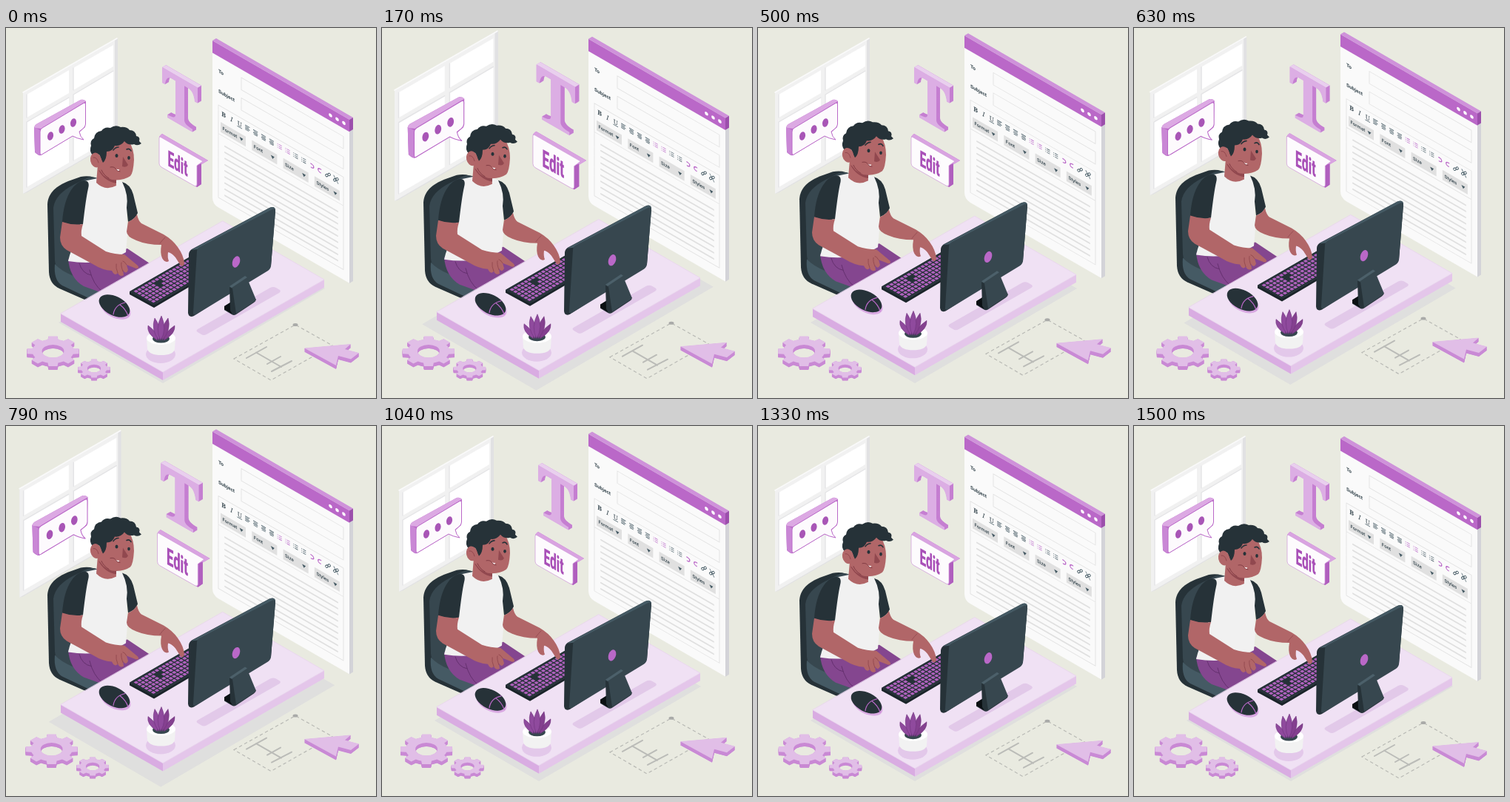
These frames come from a looping animation (500 px wide and 500 px high, 1.54 s). An HTML page:

```html
<!DOCTYPE html>
<html lang="en">
<head>
<meta charset="utf-8">
<title>Editing at a desk</title>
<style>
html, body { margin: 0; width: 100%; height: 100%; overflow: hidden; background: #e9eae0; }
svg { display: block; width: 100vw; height: 100vh; }
text { font-family: Roboto, sans-serif; }
.skin { fill: #b16668; }
.dark { fill: #263238; }
.slate { fill: #37474f; }
.line { fill: none; stroke-linecap: round; stroke-linejoin: round; }
</style>
</head>
<body>
<svg viewBox="0 0 500 500">
  <g data-beat="251 375">
    <path d="M71 398L290 271L431 352L212 480Z" fill="#dfdfde"/>
  </g>

  <g data-beat="87.3 119">
    <path d="M23 87L147 15L151 14V151L27 223L23 224Z" fill="#e1e1e3"/>
    <path d="M23 87L147 16V152L23 224Z" fill="#f1f1f1"/>
    <path d="M28 90L85 57V88L28 121ZM91 54L145 23V52L91 84ZM28 127L85 94V182L28 215ZM91 90L145 58V148L91 179Z" fill="#fff"/>
    <path class="line" d="M28 121V90M91 84V54M28 215V127M91 179V90M28 127L85 94M91 90L145 58" stroke="#e4e4e6" stroke-width="1.4"/>
    <path class="line" d="M23 87L150 14" stroke="#fafafa" stroke-width="1.6"/>
  </g>

  <g data-beat="73 135">
    <path d="M38 135Q38 132 41 130L101 97Q105 96 108 99L107 134L100 140L47 172Q44 173 39 168Z" fill="#ba68c8"/>
    <path d="M38 135Q38 132 41 130L101 97Q105 96 108 99L48 136Z" fill="#dca9e3"/>
    <path d="M38 134L46 138V172L41 169.500Q39 168 39 165Z" fill="#c987d5"/>
    <path d="M46 140Q46 137 49 135L104 102Q107.500 100 107.500 104V130Q107.500 133 104 136L99 140Q100 147 105 151Q95 149 90 146L50 170Q46 173 46 169Z" fill="#fdfafd" stroke="#ba68c8" stroke-width="1"/>
    <g fill="#a855b6">
      <ellipse cx="60" cy="146" rx="3.900" ry="5.900" transform="rotate(14 60 146)"/>
      <ellipse cx="75.500" cy="137" rx="3.900" ry="5.900" transform="rotate(14 75.500 137)"/>
      <ellipse cx="91" cy="128" rx="3.900" ry="5.900" transform="rotate(14 91 128)"/>
    </g>
  </g>

  <g data-float>
    <path d="M279 17L284 14L467 120Q469 121 469 124V342L464 345Z" fill="#d3d3d8"/>
    <path d="M279 17L284 14L469 121L464 124Z" fill="#cf92da"/>
    <path d="M464 124L469 121V137L464 140Z" fill="#9c4fac"/>
    <g id="panel" transform="matrix(1 .577 0 1 279 17)">
      <path d="M0 0H185V221H8Q0 221 0 212Z" fill="#fafafa"/>
      <path d="M0 0H185V16.500H0Z" fill="#ba68c8"/>
      <g fill="#fff"><circle cx="159.500" cy="9" r="2.300"/><circle cx="168.500" cy="9" r="2.300"/><circle cx="177.500" cy="9" r="2.300"/></g>
      <path d="M39 27.500H177V44H39ZM39 55H177V71.500H39ZM8 82.400H177V207.400H8ZM8 121H177" fill="none" stroke="#e2e2e2" stroke-width=".9"/>
      <g class="slate" font-size="6.500" font-weight="600"><text x="8" y="38.500">To</text><text x="8" y="65.500">Subject</text></g>
    </g>
  </g>

  <g data-beat="237.700 92"><g id="letter" transform="matrix(1 .577 0 1 211 53)"></g></g>

  <g data-beat="240 179">
    <path d="M207 147L211 143L273 179L264 184V211L258 215L209 187Z" fill="#ba68c8"/>
    <path d="M207 148Q208 144 211 143L273 179L265 184L258 184Z" fill="#d9a3e1"/>
    <path d="M258 186L264 183V211L258 215Z" fill="#b05fbe"/>
    <path d="M207 149Q207 146 210 148L266 180L258 186V211Q258 215 254 213L210 188Q207 186 207 183Z" fill="#fdfbfd" stroke="#cf9ad8" stroke-width=".7"/>
    <text transform="matrix(.52 .29 0 1 218.500 186)" fill="#a950b8" font-size="30" font-weight="800">Edit</text>
  </g>

  <g data-float>
    <path d="M308 447L391 401L441 429L358 476Z" fill="none" stroke="#b9bab5" stroke-width="1.200" stroke-dasharray="4.500 3.500"/>
    <ellipse cx="391" cy="401" rx="3.500" ry="2" fill="#a9aaa8"/>
    <path class="line" d="M325 446L352 431M338 438.500L372 458M353 454L371 444M359 464L386 450" stroke="#bbbcb8" stroke-width="2"/>
    <g id="cursor"></g>
  </g>

  <g data-float>
    <!-- chair -->
    <path class="dark" d="M56 238C57 222 69 213 84 207L101 201Q116 198 127 206L131 360L113 370L72 352Q59 346 58 330Z"/>
    <path class="slate" d="M64 243C66 229 76 220 91 212L109 203Q120 199 128 206L131 358L80 334Q67 328 66 314Z"/>
    <path d="M66 319Q74 328 91 335L132 355L114 366L76 348Q64 341 66 319Z" fill="#455a64"/>
    <!-- trousers -->
    <path d="M84 312Q86 338 105 349L130 358L194 318L164 298Z" fill="#84468f"/>
    <path class="line" d="M99 318Q103 332 115 334M130 356Q118 347 113 327" stroke="#65306f" stroke-width="1"/>

    <!-- table -->
    <path d="M74 386L212 465V476L74 397Z" fill="#d9ace2"/>
    <path d="M212 465L430 340V350.500L212 476Z" fill="#e4c6ea"/>
    <path d="M74 386L293 261L430 340L212 465Z" fill="#f0e1f4"/>
    <path class="line" d="M74 386L212 465L430 340L293 261Z" stroke="#e9d3ee" stroke-width=".8"/>
    <path d="M259 407L357 351Q361 349 365 351L370 354Q372 356 369 358L271 414Q267 416 264 414L259 411Q256 409 259 407Z" fill="#e2c9e9"/>
    <ellipse cx="209" cy="441" rx="20" ry="12" fill="#e3c8ea"/>
    <ellipse cx="148" cy="379" rx="22" ry="12.500" transform="rotate(26 148 379)" fill="#d9a9e2"/>

    <!-- torso and head -->
    <path d="M105 207L124 203Q136 216 150 205L160 209Q166 230 163 252L164 280L162 303Q130 322 84 315Q87 300 99 277Z" fill="#f1f1f1"/>
    <path class="skin" d="M124 185L122 209Q134 221 149 213L148 200Z"/>
    <path d="M125 192Q133 207 149 210L149 203Z" fill="#91484f"/>
    <path class="skin" d="M128 170Q143 150 166 153Q173 163 173 178Q172 196 168 200Q158 207 143 205Q129 201 125 188Z"/>
    <path class="dark" d="M117 172Q112 166 115 159Q113 152 119 149Q120 140 129 139Q133 133 141 135Q148 130 155 134Q163 133 167 138Q175 138 176 146Q182 147 180 153L183 156Q178 160 173 157Q165 159 160 153Q155 160 147 159Q144 167 136 167Q136 178 131 182L126 171Z"/>
    <ellipse class="skin" cx="121.500" cy="178.500" rx="7.500" ry="10" transform="rotate(-12 121.500 178.500)"/>
    <path class="line" d="M118 175Q123 174 125 182" stroke="#91484f" stroke-width="1"/>
    <path d="M158 174L165 185Q163 189 157 187Z" fill="#91484f"/>
    <path class="line" d="M145 165Q148 161 152 161M163 164Q167 162 169 166" stroke="#263238" stroke-width="1.600"/>
    <g class="dark"><ellipse cx="149.500" cy="172.500" rx="2" ry="2.500"/><ellipse cx="166" cy="175.500" rx="1.800" ry="2.400"/></g>
    <path d="M148 190Q151 192 153 191Q153 196 148 190Z" fill="#fff"/>
    <path class="line" d="M141 188Q146 187 148 190Q150 194 154 194M129 192Q132 199 139 203" stroke="#7c3840" stroke-width=".9"/>
    <path class="dark" d="M105 206Q114 206 111 217Q108 230 104 265Q89 267 76 262Q78 234 88 219Q95 208 105 206Z"/>
    <path class="dark" d="M157 208Q168 211 172 225L178 250Q175 258 165 262L163 243Q166 226 157 208Z"/>

    <!-- keyboard -->
    <path class="dark" d="M167 356L261 302V306L199 377L167 359Z"/>
    <path d="M167 357L200 374L293 320V323L200 378L167 360Z" fill="#1b252a"/>
    <g id="keys" transform="matrix(.866 -.5 .866 .5 167.500 356)">
      <rect width="108" height="37" rx="2" fill="#263238"/>
    </g>

    <!-- mouse -->
    <ellipse class="dark" cx="146.500" cy="375.500" rx="22.500" ry="12.800" transform="rotate(27 146.500 375.500)"/>
    <path class="line" d="M145 387Q147 374 161 371M154 374Q162 380 165 389" stroke="#ba68c8" stroke-width="1.200"/>

    <!-- arms -->
    <path class="skin" d="M165 262Q173 259 177 252Q179 261 183 264L213 279Q225 286 232 296Q240 307 241 318Q240 323 236 321L229 310Q224 304 219 303Q218 310 220 315Q215 318 211 311Q208 304 210 293Q190 293 176 287Q163 282 163 275Z"/>
    <path class="line" d="M208 291Q211 287 215 283" stroke="#91484f" stroke-width=".8"/>
    <path class="skin" d="M76 262Q90 267 104 265Q101 274 102 281L135 302Q147 306 160 306L178 321Q181 325 176 325L163 320L165 327Q162 334 158 327L159 334Q154 337 151 331Q147 336 143 328Q130 327 119 320L82 300Q73 294 73 283Z"/>
    <path class="line" d="M151 331Q148 324 149 319M158 329Q155 321 156 317M163 320Q160 315 158 315" stroke="#91484f" stroke-width=".9"/>

    <!-- monitor -->
    <path d="M295 376L309 367L338 366Q338 369 335 371L311 387Q308 389 305 387L295 381Z" fill="#263238"/>
    <path d="M295 376L305 370V386L295 380Z" fill="#0b1013"/>
    <path class="dark" d="M247 306Q247 302 251 299L356 243Q364 240 364 247L358 322L254 389Q247 392 246 385Z"/>
    <path d="M250 300L356 243Q362 240 364 245L259 299Z" fill="#455a64"/>
    <path class="slate" d="M258 302Q258 298 262 296L360 245Q364 243 364 248L358 321Q358 325 354 328L257 387Q252 389 253 384Z"/>
    <ellipse cx="311" cy="316" rx="4.900" ry="7.900" transform="rotate(20 311 316)" fill="#ba68c8"/>
    <path class="slate" d="M302 350L325 336L337 365Q338 368 335 370L311 386Q307 388 306 384Z"/>
    <path class="dark" d="M302 350L306 352L311 386Q306 388 303 382Z"/>
    <path d="M302 349L323 335L326 337L305 351Z" fill="#4c606a"/>

    <!-- plant -->
    <path d="M190 419L191 434Q194 442 209.500 442Q226 442 228 434L229 419Z" fill="#f2f2f2"/>
    <ellipse cx="209.500" cy="419" rx="19.500" ry="8.800" fill="#fff"/>
    <ellipse class="slate" cx="209.500" cy="420" rx="11.500" ry="5.500"/>
    <g id="leaves"></g>
  </g>

  <g id="gears"></g>
</svg>
<script>
const NS = 'http://www.w3.org/2000/svg';
const $ = id => document.getElementById(id);

function add(parent, tag, attrs, text) {
  const el = document.createElementNS(NS, tag);
  for (const k in attrs) el.setAttribute(k, attrs[k]);
  if (text) el.textContent = text;
  return parent.appendChild(el);
}

// Solid look: copies of a shape from the far offset up to the face.
function extrude(parent, d, dx, dy, side, face) {
  const n = 12;
  for (let i = n; i >= 0; i--) {
    const k = i / n;
    add(parent, 'path', { d, fill: i ? side : face, 'fill-rule': 'evenodd',
      transform: `translate(${dx * k} ${dy * k})` });
  }
}

function buildPanel() {
  const p = $('panel'), ink = '#455a64', violet = '#ba68c8';
  const stroke = (d, color, width) =>
    add(p, 'path', { d, class: 'line', stroke: color, 'stroke-width': width });
  for (let i = 0; i < 9; i++) {
    stroke(`M17 ${133.2 + i * 8.3}h152`, '#e0e0e0', 2);
  }
  ['Format', 'Font', 'Size', 'Styles'].forEach((name, i) => {
    const x = 11 + i * 42.3;
    add(p, 'rect', { x, y: 103.7, width: 34, height: 13.5, fill: '#e0e0e0' });
    add(p, 'text', { x: x + 2.5, y: 112.7, fill: '#37474f', 'font-size': 6.2, 'font-weight': 500 }, name);
    add(p, 'path', { d: `M${x + 25.5} 109h5l-2.500 4z`, fill: ink });
  });
  const at = i => 15 + i * 10.85;
  ['B', 'I', 'U'].forEach((name, i) => add(p, 'text', {
    x: at(i), y: 94.5, fill: '#37474f', 'font-size': 8.5, 'text-anchor': 'middle',
    'font-weight': i ? 400 : 700, 'font-style': i === 1 ? 'italic' : 'normal',
    style: 'font-family:"Noto Serif",serif' }, name));
  stroke(`M${at(2) - 3} 96h6`, ink, .7);
  for (let i = 3; i < 11; i++) {
    const x = at(i) - 3, list = i > 6, color = i === 7 || i === 8 ? violet : ink;
    for (let r = 0; r < 4; r++) {
      const y = 88.5 + r * 1.9;
      if (!list) stroke(`M${x + (r % 2 && i > 3 ? .8 : 0)} ${y}h${r % 2 ? 4.2 : 5.5}`, ink, .9);
      else if (r < 3) stroke(`M${x} ${y + r * .5}h.3M${x + 2} ${y + r * .5}h3.500`, color, .8);
    }
  }
  [11, 12].forEach(i => {
    const x = at(i), s = i === 11 ? 1 : -1;
    stroke(`M${x - 1.5 * s} 89.500h${1.5 * s}q${2.5 * s} .300 ${2.5 * s} 2.400t${-2.5 * s} 2.400h${-s}`, violet, 1.3);
  });
  [13, 14].forEach(i => {
    const x = at(i);
    for (const s of [-1, 1]) add(p, 'ellipse', { cx: x + s * 1.6, cy: 91.5 - s * 1.5, rx: 2.3, ry: 1.3,
      fill: 'none', stroke: ink, 'stroke-width': .9,
      transform: `rotate(-50 ${x + s * 1.6} ${91.5 - s * 1.5})` });
    if (i === 14) stroke(`M${x - 3} 87.500l6 8`, ink, .8);
  });
}

function buildLetter() {
  const g = $('letter');
  const d = 'M0 0H48V21H44C43 12 40 8 35 8H30V54C30 58 33 60 41 60V64H7V60C15 60 18 58 18 54V8H13C8 8 5 12 4 21H0Z';
  extrude(g, d, 5, -5.9, '#c57fd1', '#dcaee4');
  add(g, 'path', { d: 'M0 0H48L53 -5.900H5Z', fill: '#e9cfee' });
}

function buildKeys() {
  const g = $('keys');
  for (let r = 0; r < 6; r++) {
    for (let c = 0; c < 19; c++) {
      if (r === 1 && (c === 5 || c === 6) || r === 2 && c === 5) continue;
      add(g, 'rect', { x: 3 + c * 5.4, y: 2.7 + r * 5.4, width: 4, height: 4, rx: .5, fill: '#b062be' });
    }
  }
}

function buildLeaves() {
  const tips = [[192, 402], [228, 402], [201, 392], [219, 392], [210, 389]];
  tips.forEach(([x, y], i) => {
    const bx = 209 + (x - 210) * .25, by = 422;
    const mx = (x + bx) / 2, my = (y + by) / 2 - 1, w = 8.5;
    add($('leaves'), 'path', { d: `M${bx} ${by}Q${mx - w} ${my + 2} ${x} ${y}Q${mx + w} ${my + 2} ${bx} ${by}Z`,
      fill: i % 2 ? '#84408f' : '#8f4a9d', stroke: '#6b3078', 'stroke-width': .5 });
  });
}

function gear(x, y, r, depth) {
  const g = add($('gears'), 'g', {}), teeth = 8, pts = [];
  const put = (rad, a) => pts.push([x + rad * Math.cos(a), y + rad * .577 * Math.sin(a)].map(v => v.toFixed(2)));
  for (let i = 0; i < teeth; i++) {
    const a = i * 2 * Math.PI / teeth;
    for (const s of [-1, 1]) {
      const out = [[r * .79, a + s * .25], [r, a + s * .17]];
      if (s > 0) out.reverse();
      out.forEach(q => put(...q));
    }
    for (const k of [.35, .45]) put(r * .79, a + k);
  }
  const h = r * .42, v = h * .577;
  const d = `M${pts.join('L')}ZM${x - h} ${y}a${h} ${v} 0 1 0 ${2 * h} 0a${h} ${v} 0 1 0 ${-2 * h} 0Z`;
  extrude(g, d, 0, depth, '#c989d4', '#e1bee7');
}

buildPanel();
buildLetter();
buildKeys();
buildLeaves();
gear(63.5, 436.700, 35.5, 5);
gear(119, 460, 22, 4);
extrude($('cursor'), 'M403 432.500L466 427L458 434L477 439L466 447.500L449 443L446 456Z', 0, 5, '#c98ad5', '#e1bee7');

// Linear interpolation through [position, value] stops.
function track(stops, p) {
  for (let i = 1; i < stops.length; i++) {
    const [a, u] = stops[i - 1], [b, v] = stops[i];
    if (p <= b) return u + (v - u) * (p - a) / (b - a);
  }
  return stops[stops.length - 1][1];
}

const LOOP = 1540, CYCLE = 1500;
const FLOAT = [[0, 0], [.5, -10], [1, 0]];
const BEAT = [[0, 1], [.1, 1.1], [.3, 1], [.4, 1], [.5, 1.1], [.6, 1], [1, 1]];
const SHAKE = [0, -1, 2, -4, 4, -4, 4, -4, 2, -1, 0].map((x, i) => [i / 10, x]);
const floats = document.querySelectorAll('[data-float]');
const beats = [...document.querySelectorAll('[data-beat]')].map(el => [el, ...el.dataset.beat.split(' ')]);

function draw(ms) {
  const p = Math.min(1, ms % LOOP / CYCLE);
  const dy = track(FLOAT, p), k = track(BEAT, p);
  floats.forEach(el => el.setAttribute('transform', `translate(0 ${dy})`));
  beats.forEach(([el, x, y]) =>
    el.setAttribute('transform', `translate(${x} ${y}) scale(${k}) translate(${-x} ${-y})`));
  $('gears').setAttribute('transform', `translate(${track(SHAKE, p)} 0)`);
}

let start = null;
function tick(now) {
  if (start === null) start = now;
  draw(now - start);
  requestAnimationFrame(tick);
}
draw(0);
requestAnimationFrame(tick);
</script>
</body>
</html>
```
